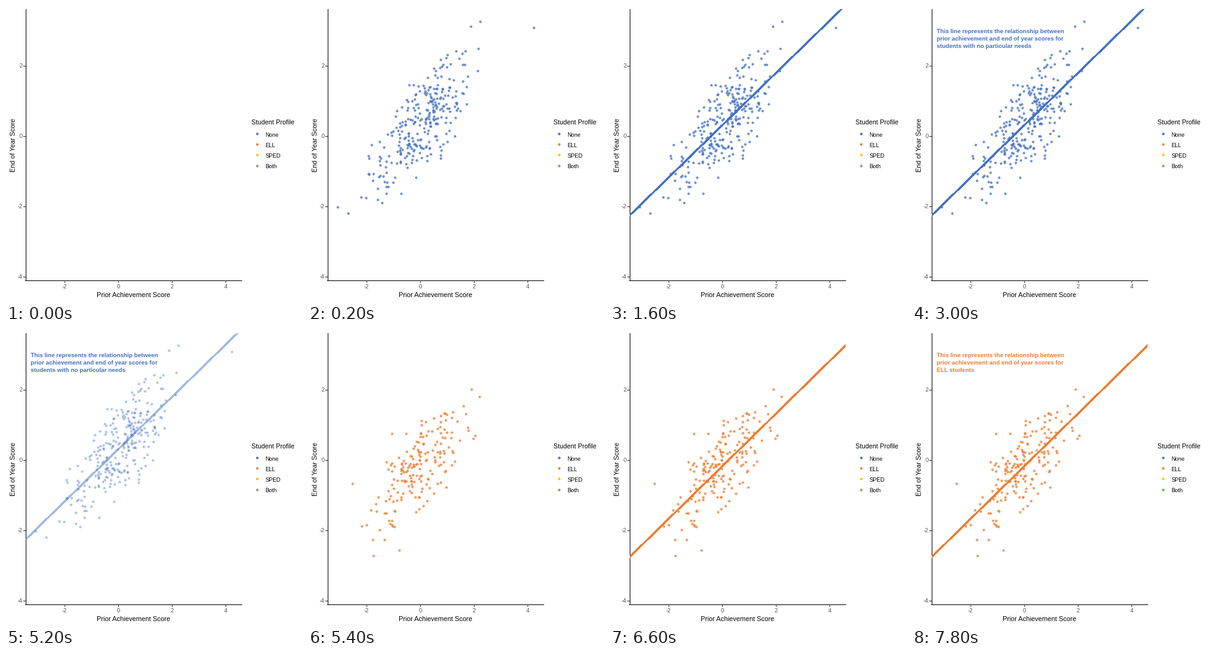
Write a matplotlib script that moves like this. It is 480 by 480 pixels and loops after 8000 ms.

```python
import matplotlib.pyplot as plt
import numpy as np
from matplotlib.animation import FuncAnimation
from matplotlib.patches import Rectangle

SIZE, DPI = 480, 96
PT = 72 / DPI  # points per pixel
STEP, LOOP = 200, 8000
BLUE, ORANGE, YELLOW, GREEN = "#4472C4", "#ED7D31", "#FFC000", "#70AD47"
POINT_ALPHA = 0.75

plt.rcParams["font.family"] = "Liberation Sans"
plt.rcParams["text.hinting"] = "native"

fig = plt.figure(figsize=(SIZE / DPI, SIZE / DPI), dpi=DPI, facecolor="white")
ax = fig.add_axes([0, 0, 1, 1])
ax.set_xlim(0.5, SIZE + 0.5)  # whole numbers are pixel centres, counted from 1
ax.set_ylim(SIZE + 0.5, 0.5)
ax.axis("off")

panel = Rectangle((32.5, 5.5), 349.5, 440, transform=ax.transData)


def label(x, y, text, px=9.1, color="black", **kw):
    kw.setdefault("va", "baseline")
    return ax.text(x, y, text, fontsize=px * PT, color=color, **kw)


def stroke(xs, ys, color="black", px=1.0, **kw):
    return ax.plot(xs, ys, color=color, lw=px * PT, solid_capstyle="butt",
                   antialiased=False, **kw)[0]


def dots(x, y, color, alpha=None):
    """Four-pixel dots whose rim overlaps the fill."""
    return ax.scatter(x, y, s=(3.4 * PT) ** 2, facecolors=color, edgecolors=color,
                      linewidths=0.6 * PT, alpha=alpha, antialiased=False, zorder=2)


def draw_axes():
    stroke([32, 32], [5.5, 445.5])
    stroke([31.5, 382.5], [445, 445])
    for v in (-4, -2, 0, 2):
        y = 211 - 57 * v
        stroke([28.5, 31.5], [y, y], "#333333")
        label(27.5, y + 3.5, f"{v}", color="#4D4D4D", ha="right")
    for v in (-2, 0, 2, 4):
        x = 182.5 + 43.6 * v
        stroke([x, x], [445.5, 448.5], "#333333")
        label(x, 459, f"{v}", color="#4D4D4D", ha="center")
    label(207.5, 473, "Prior Achievement Score", 10.9, ha="center")
    label(16, 226, "End of Year Score", 10.9, rotation=90,
          rotation_mode="anchor", ha="center")


def draw_legend():
    label(399, 193, "Student Profile", 10.6)
    rows = (("None", BLUE), ("ELL", ORANGE), ("SPED", YELLOW), ("Both", GREEN))
    for i, (name, color) in enumerate(rows):
        y = 207.3 + 17.3 * i
        dots([407.2], [y], color)
        label(421, y + 4.7, name, 9.2)


class Group:
    """Scatter, fitted line and caption of one student profile."""

    def __init__(self, color, start, end, count, seed, spread, outliers, last_line):
        slope = (end[1] - start[1]) / (end[0] - start[0])

        def fit(x):
            return start[1] + slope * (x - start[0])

        z = np.random.default_rng(seed).normal(size=(count * 2, 2))
        z = z[np.hypot(*z.T) < 2.3][:count]
        x = 183 + 44 * z[:, 0]
        cloud = np.column_stack([x, fit(x) + spread * z[:, 1]])
        pts = np.vstack([cloud, outliers])
        self.dots = dots(pts[:, 0], pts[:, 1], color, POINT_ALPHA)

        ends = np.array([20, 400])
        self.line = stroke(ends, fit(ends), color, 2, zorder=3)
        self.line.set_clip_path(panel)

        rows = ("This line represents the relationship between",
                "prior achievement and end of year scores for", last_line)
        self.caption = [label(41, 44 + 12.2 * i, row, 9.57, color, weight="bold", zorder=4)
                        for i, row in enumerate(rows)]

    def show(self, points, line, caption, fade=1.0):
        self.dots.set_visible(points)
        self.dots.set_alpha(POINT_ALPHA * fade)
        self.line.set_visible(line)
        self.line.set_alpha(fade)
        for row in self.caption:
            row.set_visible(caption)


draw_axes()
draw_legend()
none = Group(BLUE, (32.5, 340), (376.5, 5), 285, 11, 40,
             [(48, 326), (65, 336), (366, 35), (279, 25), (264, 33)],
             "students with no particular needs")
ell = Group(ORANGE, (32.5, 368.5), (382, 26), 186, 5, 36,
            [(72, 249), (136, 168), (106, 366), (148, 357)],
            "ELL students")


def draw(i):
    t = i * STEP
    first = t < 5400
    none.show(200 <= t and first, 1600 <= t and first, 3000 <= t and first,
              0.5 if t >= 5200 else 1.0)
    ell.show(t >= 5400, t >= 6600, t >= 7800)


anim = FuncAnimation(fig, draw, frames=LOOP // STEP, interval=STEP,
                     repeat=True, repeat_delay=0)
plt.show()
```
